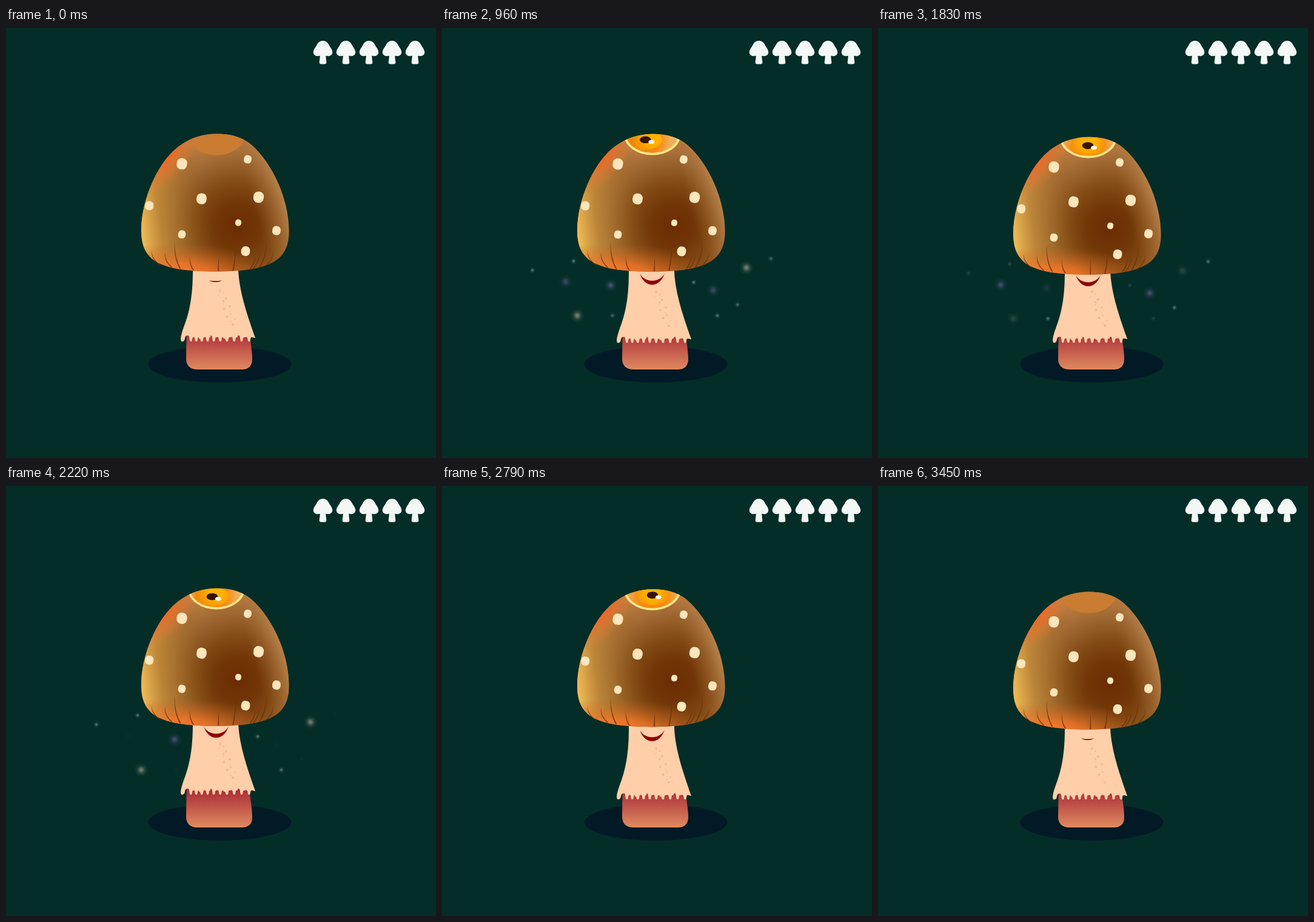
Recreate the animation shown at these times as an HTML page. Size 709 by 709 pixels, loop 3600 ms.

```html
<!DOCTYPE html>
<html lang="en">
<head>
<meta charset="utf-8">
<title>Mushroom</title>
<style>
  html, body { margin: 0; width: 100%; height: 100%; overflow: hidden; background: #042d27; }
  svg { display: block; width: 100vw; height: 100vh; }
</style>
</head>
<body>
<svg viewBox="0 0 709 709">
  <defs id="defs">
    <path id="capShape" d="M348 174.500C325 174.500 305 181 288 193C252 217 223 282 223 333C223 383 251 401 345 401.500C437 401.500 466.500 383 466.500 335C466.500 282 439 222 404 192C390 180 370 174.500 348 174.500Z"/>
    <clipPath id="capClip"><use href="#capShape"/></clipPath>
    <clipPath id="eyeClip"><ellipse cx="346.8" cy="175" rx="45" ry="32.5"/></clipPath>
    <radialGradient id="base" gradientUnits="userSpaceOnUse" cx="382" cy="326" r="158">
      <stop offset="0" stop-color="#6c2c04"/>
      <stop offset=".22" stop-color="#713506"/>
      <stop offset=".45" stop-color="#824a14"/>
      <stop offset=".7" stop-color="#9f6833"/>
      <stop offset="1" stop-color="#c88545"/>
    </radialGradient>
    <linearGradient id="leftGlow" gradientUnits="userSpaceOnUse" x1="223" y1="330" x2="335" y2="315">
      <stop offset="0" stop-color="#efba55"/>
      <stop offset=".3" stop-color="#bd8838" stop-opacity=".85"/>
      <stop offset="1" stop-color="#8a5518" stop-opacity="0"/>
    </linearGradient>
    <linearGradient id="rightGlow" gradientUnits="userSpaceOnUse" x1="470" y1="285" x2="410" y2="302">
      <stop offset="0" stop-color="#cf9a62" stop-opacity=".85"/>
      <stop offset="1" stop-color="#a06a38" stop-opacity="0"/>
    </linearGradient>
    <radialGradient id="redGlow" gradientUnits="userSpaceOnUse" cx="0" cy="0" r="1" gradientTransform="translate(260 211) rotate(-50) scale(85 40)">
      <stop offset="0" stop-color="#fb5f1e"/>
      <stop offset="1" stop-color="#e8803e" stop-opacity="0"/>
    </radialGradient>
    <radialGradient id="bottomGlow" gradientUnits="userSpaceOnUse" cx="0" cy="0" r="1" gradientTransform="translate(292 407) rotate(2) scale(155 52)">
      <stop offset="0" stop-color="#ff7426"/>
      <stop offset=".35" stop-color="#f87628" stop-opacity=".75"/>
      <stop offset="1" stop-color="#c06020" stop-opacity="0"/>
    </radialGradient>
    <linearGradient id="footFill" gradientUnits="userSpaceOnUse" x1="0" y1="503" x2="0" y2="563">
      <stop offset="0" stop-color="#ab2f39"/>
      <stop offset="1" stop-color="#e08a60"/>
    </linearGradient>
    <radialGradient id="irisFill" gradientUnits="userSpaceOnUse" cx="347" cy="181" r="44">
      <stop offset=".25" stop-color="#ffb200"/>
      <stop offset="1" stop-color="#ec7410"/>
    </radialGradient>
    <radialGradient id="whiteFill" gradientUnits="userSpaceOnUse" cx="346" cy="184" r="60">
      <stop offset=".4" stop-color="#f48a14"/>
      <stop offset=".7" stop-color="#eeb05c"/>
      <stop offset="1" stop-color="#e8b46a"/>
    </radialGradient>
  </defs>

  <rect width="709" height="709" fill="#042d27"/>
  <g id="score" fill="#f3f7f5"></g>
  <ellipse cx="352.5" cy="554.5" rx="118" ry="30" fill="#021a26"/>
  <path fill="url(#footFill)" d="M298 485L400 485C402 515 406 530 406 546C406 557 400 563 389 563L316 563C303 563 297 556 297 545Z"/>
  <g id="stem">
    <path id="skin" fill="#fecfa9"/>
    <g id="speckles" fill="#eebd95"></g>
  </g>
  <path id="mouth" fill="#8e0008"/>
  <g id="cap">
    <g id="sparks"></g>
    <g id="shades"></g>
    <g id="gills" fill="#6b3008" fill-opacity=".85"></g>
    <g id="spots" fill="#fee5bb"></g>
    <g clip-path="url(#capClip)">
      <g id="eye">
        <g clip-path="url(#eyeClip)">
          <rect x="295" y="165" width="105" height="50" fill="url(#whiteFill)"/>
          <ellipse id="iris" rx="28" ry="16" fill="url(#irisFill)"/>
          <g id="pupil">
            <ellipse rx="9.3" ry="5.8" fill="#321400"/>
            <ellipse cx="10" cy="3.5" rx="5" ry="3.3" fill="#fffbe6"/>
          </g>
        </g>
        <ellipse cx="346.8" cy="175" rx="45" ry="32.5" fill="none" stroke="#fde98a" stroke-width="3.5"/>
      </g>
      <ellipse id="lid" cx="346.8" cy="175" rx="47.2" ry="34.8" fill="#c97c32"/>
    </g>
  </g>
</svg>
<script>
const LOOP = 3600, STEP = 30;
const $ = id => document.getElementById(id);

function set(el, attrs) {
  for (const k in attrs) el.setAttribute(k, attrs[k]);
  return el;
}

function add(parent, tag, attrs) {
  const el = document.createElementNS('http://www.w3.org/2000/svg', tag);
  return parent.appendChild(set(el, attrs));
}

const mix = (a, b, k) => a + (b - a) * k;
const bell = (t, mid, width) => Math.exp(-(((t - mid) / width) ** 2));

// Key poses are [time, value]; the value eases in and out between them.
function track(keys, t) {
  const i = keys.findIndex(k => t < k[0]);
  if (i === 0) return keys[0][1];
  if (i < 0) return keys[keys.length - 1][1];
  const [t0, a] = keys[i - 1], [t1, b] = keys[i];
  return mix(a, b, (1 - Math.cos(Math.PI * (t - t0) / (t1 - t0))) / 2);
}

const stemBob = [[720, 0], [1440, 9], [2340, -8.8], [2460, -9], [2820, 0]];
const capBob = [[870, 0], [1620, 7.6], [2460, -9], [2600, -9], [2970, 0]];
const opening = [[0, 0], [450, 1], [3120, 1], [3450, 0]];
const gaze = [[540, 346], [920, 335], [1430, 360], [1830, 346], [2220, 340], [2700, 347]];
const glowSpan = [[570, 0], [900, 1], [2340, 1], [2640, 0]];

for (let i = 0; i < 5; i++) {
  add($('score'), 'path', {
    transform: `translate(${522.5 + i * 38} 0)`,
    d: 'M0 21C5 21 8 24 10 28C12 32 16 36 15.700 40.500C15.400 44.500 12 46.500 8 46.300L4.800 45.800C4.800 50 5.500 53 5.800 56C6 58.500 5 59.500 3 59.500H-3C-5 59.500-6 58.500-5.800 56C-5.500 53-4.800 50-4.800 45.800L-8 46.300C-12 46.500-15.400 44.500-15.700 40.500C-16 36-12 32-10 28C-8 24-5 21 0 21Z'
  });
}

// Stem with a dripping hem, drawn from right to left.
let skin = 'M308 385L383 385L383 400C385 435 396 468 411 511', px = 411, py = 511;
function hemTo(x, y) {
  skin += `C${mix(px, x, .8)} ${py} ${mix(px, x, .2)} ${y} ${x} ${y}`;
  px = x; py = y;
}
for (let i = 0; i < 10; i++) {
  const x = 401 - 10.67 * i - 5 * Math.sin(Math.PI * i / 9);
  hemTo(x + 4, 510);
  hemTo(x, 517);
  hemTo(x - 5, 509.5 - 2.5 * Math.sin(Math.PI * i / 2));
}
hemTo(290, 517);
$('skin').setAttribute('d', skin + 'C285 515 291 499 296 485C303 465 308 440 308 400Z');

for (let i = 0; i < 14; i++) {
  add($('speckles'), 'circle', {
    cx: 353 + 1.7 * i + 6 * Math.sin(i * 2.4), cy: 433 + 4.3 * i, r: 1.5 + .6 * Math.cos(i * 1.9)
  });
}

for (const shade of ['base', 'rightGlow', 'leftGlow', 'redGlow', 'bottomGlow'])
  add($('shades'), 'use', { href: '#capShape', fill: `url(#${shade})` });

const spots = [[290, 224, 8.5], [398.5, 216.5, 6.3], [322.5, 281.5, 8.3], [416.5, 279, 8.5],
  [236.3, 293, 6.9], [383, 321, 5], [446, 334, 6.9], [290, 340.3, 6.2], [395, 368, 7.3]];
for (const [x, y, r] of spots) {
  add($('spots'), 'rect', {
    x: x - r, y: y - r * 1.08, width: 2 * r, height: 2.16 * r, rx: r * .85, ry: r * .92,
    transform: `rotate(8 ${x} ${y})`
  });
}

// Gills taper upwards from the rim and lean towards its middle.
[240, 262, 278, 303, 351, 379, 412, 418, 430, 441].forEach((x, i) => {
  const foot = mix(x, 345, .14);
  const rim = 401 - 11 * ((foot - 345) / 95) ** 2;
  const top = rim - (i % 3 === 2 ? 44 : 25), bend = mix(top, rim, .6);
  add($('gills'), 'path', {
    d: `M${x} ${top}Q${x} ${bend} ${foot + 1} ${rim}L${foot - 1} ${rim}Q${x - 1.5} ${bend} ${x} ${top}Z`
  });
});

const hues = { pale: '#8fa898', violet: '#6862a0', cream: '#b3b295' };
for (const id in hues) {
  const g = add($('defs'), 'radialGradient', { id });
  [.9, .6, .22, .08, 0].forEach((o, i) =>
    add(g, 'stop', { offset: i / 4, 'stop-color': hues[id], 'stop-opacity': o }));
}

// Two groups of sparks twinkle in turn; the big ones come first.
function sparkGroup(big, points) {
  return points.map(([x, y], i) => {
    const hue = i >= big ? 'pale' : Math.abs(y - 425) < 10 ? 'violet' : 'cream';
    const el = add($('sparks'), 'circle', { cx: x, cy: y, r: i < big ? 12 : 5.5, fill: `url(#${hue})` });
    return { x, el };
  });
}
const early = sparkGroup(2, [[204, 418], [447, 432], [281, 474], [542, 380], [487, 456]]);
const late = sparkGroup(3, [[278, 424], [223, 474], [502, 395], [149, 399], [217, 384], [415, 419], [454, 474]]);

function drawSparks(group, opacity, scale) {
  for (const s of group) set(s.el, { cx: mix(346, s.x, scale), opacity });
}

function drawMouth(k, dy) {
  const l = mix(335, 326, k), r = mix(356, 367, k), y = mix(416, 403.5, k) + dy;
  const top = y + mix(1.6, 16, k), low = y + mix(4, 24.8, k), q = (r - l) * .2;
  $('mouth').setAttribute('d',
    `M${l} ${y}C${l + q} ${top} ${r - q} ${top} ${r} ${y}C${r - q} ${low} ${l + q} ${low} ${l} ${y}Z`);
}

const shift = (id, x, y) => $(id).setAttribute('transform', `translate(${x} ${y})`);

function draw(t) {
  const open = track(opening, t), shine = track(glowSpan, t);
  const cx = track(gaze, t), cy = 184 + 5.5 * bell(t, 2000, 450);

  shift('stem', 0, track(stemBob, t));
  shift('cap', 0, track(capBob, t));
  drawMouth(open, track(stemBob, t - 60));

  shift('lid', 0, -42 * open);
  $('eye').setAttribute('visibility', open > 0 ? 'visible' : 'hidden');
  shift('pupil', cx, cy);
  set($('iris'), { cx, cy });
  set($('whiteFill'), { cx, cy });

  drawSparks(early, shine * (.65 * bell(t, 930, 220) + .75 * bell(t, 1860, 220)),
    1 + .014 * bell(t, 1650, 450));
  drawSparks(late, shine * (.8 * bell(t, 1010, 350) + .75 * bell(t, 2200, 350)), 1);
}

const start = performance.now();
function tick() {
  const t = (performance.now() - start) % LOOP;
  draw(Math.floor(t / STEP) * STEP);
  requestAnimationFrame(tick);
}
tick();
</script>
</body>
</html>
```
